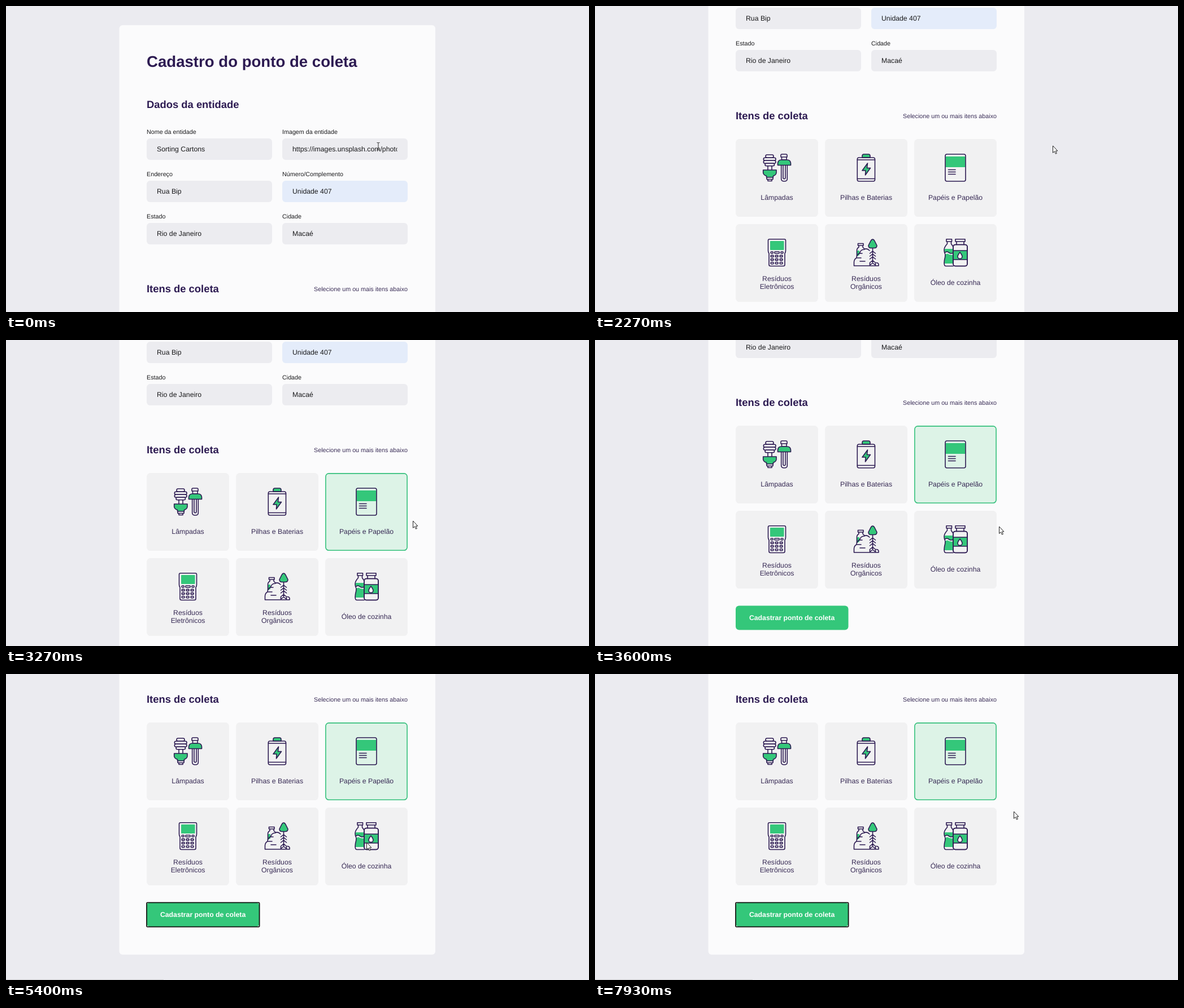
These frames come from a looping animation (1032 px wide and 543 px high, 8 s). An HTML page:

```html
<!DOCTYPE html>
<html lang="pt-BR">
<head>
<meta charset="utf-8">
<title>Cadastro do ponto de coleta</title>
<style>
  html, body { margin: 0; width: 100%; height: 100%; overflow: hidden; background: #ebebf0; }
  svg { display: block; width: 1032px; height: 543px; }
  text { font: 12.27px "Liberation Sans", Arial, sans-serif; fill: #1b1b1d; text-rendering: geometricPrecision; }
  .title { font-size: 27.6px; font-weight: bold; fill: #2d1b52; }
  .heading { font-size: 18.4px; font-weight: bold; fill: #2d1b52; }
  .label { font-size: 10.74px; }
  .hint { font-size: 10.74px; fill: #392c56; text-anchor: end; }
  .item text { fill: #392c56; text-anchor: middle; }
  .item > rect { fill: #f1f1f2; stroke: #f1f1f2; stroke-width: 1.6; }
  .item.selected > rect { fill: #ddf3e7; stroke: #35c07c; }
  .icon { fill: none; stroke: #2d1b52; stroke-width: 1.6; stroke-linejoin: round; stroke-linecap: round; }
  .icon .g { fill: #34c77a; }
  .icon .fill { fill: #34c77a; stroke: none; }
  .icon .bg { fill: #f1f1f2; }
  #buttonText { font-weight: bold; fill: #fff; text-anchor: middle; }
  #ring { fill: none; stroke: #d2cf3c; stroke-width: 2.2; }
</style>
</head>
<body>
<svg viewBox="0 0 1032 543">
  <defs><clipPath id="urlClip"><rect x="507" y="235" width="185.5" height="38"/></clipPath></defs>
  <rect width="1032" height="543" fill="#ebebf0"/>
  <g id="page">
    <rect x="200.5" y="34" width="559.5" height="921" rx="6" fill="#fbfbfc"/>
    <text class="title" x="249" y="108">Cadastro do ponto de coleta</text>
    <text class="heading" x="249" y="181">Dados da entidade</text>
    <g id="fields"></g>
    <text class="heading" x="249" y="508">Itens de coleta</text>
    <text class="hint" x="711" y="506">Selecione um ou mais itens abaixo</text>
    <g id="items"></g>
    <rect id="button" x="249" y="862.5" width="199.5" height="43" rx="6"/>
    <rect id="focus" x="249" y="862.7" width="199.6" height="43" rx="1.5" fill="none" stroke="#101410" stroke-width="1.8"/>
    <text id="buttonText" x="348.6" y="888">Cadastrar ponto de coleta</text>
  </g>
  <rect id="status" y="542" width="279" height="1" fill="#cfcfd3"/>
  <g id="ring"><circle r="1" vector-effect="non-scaling-stroke"/><circle r=".7" vector-effect="non-scaling-stroke"/></g>
  <path id="arrow" d="M.5 0V12.500l2.900-2.700 2 4.500 2-.9-2-4.300h3.500z" fill="#fff" stroke="#222" stroke-width="1"/>
  <path id="beam" d="M-2.500-6.500H-.8L0-6 .8-6.500H2.500M0-6V6M-2.500 6.500H-.8L0 6 .8 6.500H2.500" fill="none" stroke="#333" stroke-width="1"/>
</svg>
<script>
const LOOP = 8000, STEP = 1000 / 15;
const SELECT_AT = 2730, SUBMIT_AT = 4330;
const $ = id => document.getElementById(id);
const rect = (x, y, w, h, r = 0, cls = '') =>
  `<rect class="${cls}" x="${x}" y="${y}" width="${w}" height="${h}" rx="${r}"/>`;
const path = (d, cls = '') => `<path class="${cls}" d="${d}"/>`;

const fields = [
  ['Nome da entidade', 'Sorting Cartons'],
  ['Imagem da entidade', 'https://images.unsplash.com/photo-1'],
  ['Endereço', 'Rua Bip'],
  ['Número/Complemento', 'Unidade 407'],
  ['Estado', 'Rio de Janeiro'],
  ['Cidade', 'Macaé']
];
$('fields').innerHTML = fields.map(([label, value], i) => {
  const x = 249 + 240 * (i % 2), y = 235 + 75 * Math.floor(i / 2);
  const color = i === 3 ? '#e4ecfa' : '#ececf0';
  const clip = i === 1 ? 'clip-path="url(#urlClip)"' : '';
  return `<text class="label" x="${x}" y="${y - 8.5}">${label}</text>
    <rect x="${x}" y="${y}" width="222" height="38" rx="6" fill="${color}"/>
    <text x="${x + 18}" y="${y + 23}" ${clip}>${value}</text>`;
}).join('');

// Icons are drawn relative to the top left corner of their tile.
const keypad = [0, 1, 2].map(row => [0, 1, 2].map(col =>
  rect(62.2 + col * 8, 55.4 + row * 6.2, 4.8, 3, 1)).join('')).join('');
const ribs = [0, 1, 2].map(i => `M79.5 ${52 + i * 5}l5-4 5 4`).join('');

const items = [
  [['Lâmpadas'],
    rect(53, 28, 14, 5.3, 2.6) + rect(49.3, 33.3, 21.7, 5, 2.5) + rect(49.3, 38.3, 21.7, 5, 2.5) +
    rect(52, 43.3, 16.5, 4.5, 2.2) + path('M57 48v7M64 48v7') +
    path('M48.700 55H72V60Q71.500 64 66.500 65.500V68H54.500V65.500Q49.200 64 48.700 60z', 'g') +
    path('M55 68V71.500H66V68M57 71.500V74.500H64V71.500') +
    path('M80 32V29Q80 27 82 27H89Q91 27 91 29V32zM81.500 32V37H90V32') +
    path('M74.500 46.500V43Q75 37 81 37H91Q97 37 97.500 43V46.500z', 'g') +
    path('M80.700 47V71Q80.700 75 86 75 91.300 75 91.300 71V47M84 47V69.500Q86 72 88 69.500V47')],
  [['Pilhas e Baterias'],
    path('M66 33V30Q66 27 69 27H77Q80 27 80 30V33z', 'g') + rect(57.3, 33, 31.2, 42, 3) +
    path('M57.500 37H88.500M57.500 70.500H88.500') + path('M75.500 43L66 56H72L71.500 64 80.500 51.500H74.500z', 'g')],
  [['Papéis e Papelão'],
    rect(55.5, 31, 35, 19, 0, 'fill') + rect(55, 27, 36, 48, 3) +
    path('M60.500 54.500H73M60.500 58.500H73M60.500 62.500H73')],
  [['Resíduos', 'Eletrônicos'],
    path('M60 26.800H86Q88.500 26.800 88.500 29V47Q88.500 50 87 52V72Q87 74.500 84.500 74.500H61.500Q59 74.500 59 72V52Q57.500 50 57.500 47V29Q57.500 26.800 60 26.800z') +
    rect(61, 30, 24.5, 16, 1, 'fill') + rect(62.2, 49, 4, 3, 1) +
    rect(68.8, 49, 8.5, 3, 1) + rect(80, 49, 4, 3, 1) + keypad],
  [['Resíduos', 'Orgânicos'],
    path('M57 47H61V55L57 57z', 'fill') +
    path('M58.500 34.500H68V38H58.500zM60 38V41Q56.500 43 56.500 47V57M67 38V41L70 44') +
    path('M51.500 74V67Q52 62 56 60 56 54 61.500 52 63 45 69.500 45 74 42 79 47M60 52H66M57 60H64M62 66H71M51.500 74H95V71Q94 68.500 91 68.500') +
    path('M84.500 27Q86.500 27 88 30L92 38Q92 42.500 87.500 42.500H81.500Q77 42.500 77 38L81 30Q82.500 27 84.500 27z', 'g') +
    path('M84.500 43V68M79.500 73V68.500L84.500 64.500 89.500 68.500V73L84.500 69z' + ribs)],
  [['Óleo de cozinha'],
    path('M53.500 44H68V51Q65 54 61 51 57 48 54 51zM55 54Q59 51 62 54L69 55V70H53.500Q53 60 55 54z', 'fill') +
    path('M57 26.800H66.500V31H57zM58.500 31V35Q53 41 53 46 53 50 55 54 55 59 53.500 64 52 74.500 56 74.500H69M65.500 31V35L69 40M54 51Q58 47 62 51 66 53 69 51') +
    rect(69, 36.5, 25, 38, 4, 'bg') + rect(69.5, 47, 24, 16, 0, 'fill') +
    path('M73 26.800H90V31H73zM75 31V36.500M88 31V36.500M69 47H94M69 63H94') + rect(69, 36.5, 25, 38, 4) +
    path('M81 50Q85 55 85 57.500A4 4 0 0 1 77 57.500Q77 55 81 50z', 'bg')]
];
$('items').innerHTML = items.map(([lines, icon], i) => {
  const x = 249 + 158 * (i % 3), y = 543 + 151 * Math.floor(i / 3);
  const first = lines.length > 1 ? 101 : 108;
  const label = lines.map((line, n) => `<text x="73" y="${first + 14 * n}">${line}</text>`).join('');
  return `<g class="item" transform="translate(${x} ${y})">${rect(.9, .9, 144.2, 136.4, 5.5)}
    <g class="icon">${icon}</g>${label}</g>`;
}).join('');
const paper = $('items').children[2];

const cursorKeys = [
  [0, 659, 249], [70, 662, 248], [730, 792, 223], [1200, 792, 223], [1530, 805, 230], [2060, 805, 230],
  [2260, 810, 248], [2700, 692, 314], [3000, 692, 314], [3266, 720, 321], [3500, 722, 326],
  [3860, 685, 350], [4330, 357, 438], [4850, 357, 438], [5560, 680, 278], [6300, 741, 244]
];
const scrollKeys = [[2000, 0], [2260, 307], [3460, 307], [3720, 457]];

function sample(keys, t) {
  const next = keys.findIndex(key => key[0] > t);
  if (next === 0) return keys[0].slice(1);
  if (next < 0) return keys[keys.length - 1].slice(1);
  const a = keys[next - 1], b = keys[next];
  const p = (t - a[0]) / (b[0] - a[0]), eased = p * p * (3 - 2 * p);
  return a.slice(1).map((v, i) => v + (b[i + 1] - v) * eased);
}
const show = (id, visible) => $(id).setAttribute('visibility', visible ? 'visible' : 'hidden');
const move = (id, x, y, scale = 1) => $(id).setAttribute('transform', `translate(${x} ${y}) scale(${scale})`);

function draw(now) {
  const t = Math.floor((now % LOOP + 4) / STEP) * STEP;
  const [x, y] = sample(cursorKeys, t).map(Math.round);
  const scroll = Math.round(sample(scrollKeys, t)[0]);
  move('page', 0, -scroll);

  const overInput = scroll === 0 && x > 489 && x < 711;
  show('arrow', !overInput);
  show('beam', overInput);
  move('arrow', x, y);
  move('beam', x, y);

  const pageY = y + scroll;
  const hover = x > 249 && x < 449 && pageY > 862 && pageY < 906;
  $('button').setAttribute('fill', hover ? '#2eb56d' : '#34c77a');
  paper.setAttribute('class', t >= SELECT_AT ? 'item selected' : 'item');
  show('focus', t >= SUBMIT_AT);
  show('status', t >= SUBMIT_AT);

  const age = (t - (t < SUBMIT_AT ? SELECT_AT : SUBMIT_AT)) / 400;
  const ringOn = age >= 0 && age < 1;
  show('ring', ringOn);
  if (ringOn) {
    move('ring', x, y + 1, 4 + 21 * age);
    $('ring').setAttribute('opacity', 1 - age);
  }
}

const start = performance.now();
function tick() {
  draw(performance.now() - start);
  requestAnimationFrame(tick);
}
tick();
</script>
</body>
</html>
```
